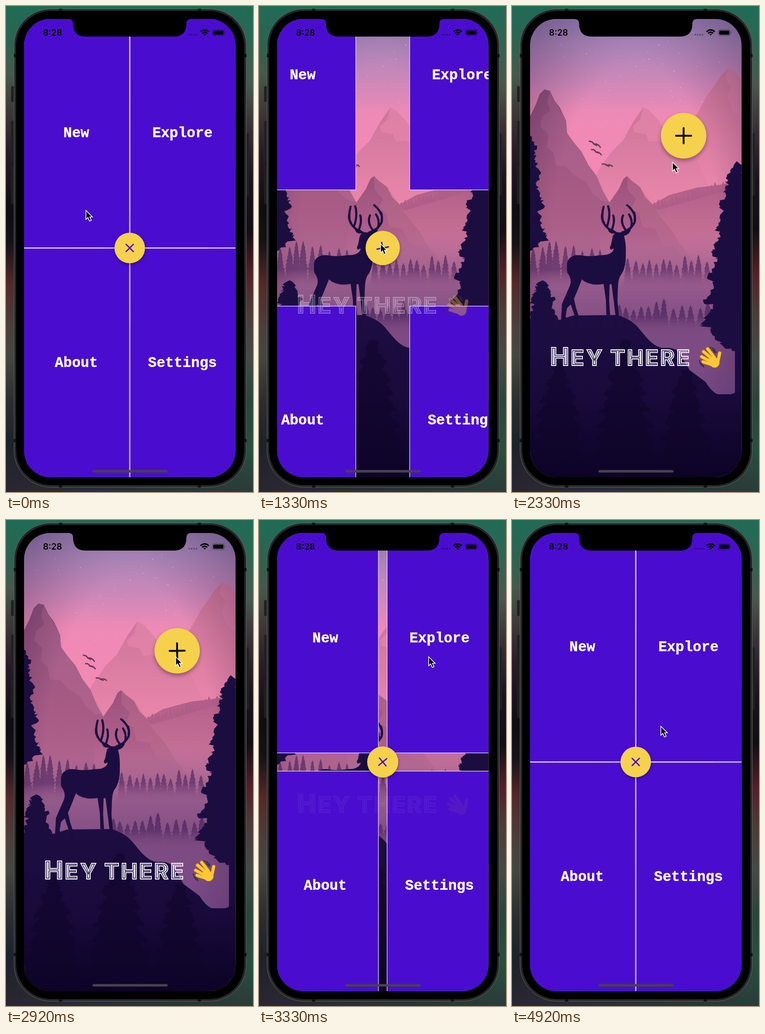
Write an HTML page that moves like this. It is 534x1049 px and loops after 5.01 s.

```html
<!DOCTYPE html>
<html lang="en">
<head>
<meta charset="utf-8">
<title>Quadrant menu</title>
<style>
@property --p { syntax: '<number>'; inherits: true; initial-value: 0; }
html, body { margin: 0; width: 100%; height: 100%; overflow: hidden; background: #222; }
.glow { position: absolute; left: 0; top: 0; width: 534px; height: 1049px; }
.left { background: linear-gradient(#206c56, #2b6552 7%, #465a4b 14%, #413a3a 21%, #291c2a 30%, #100d13 42%, #17131a 49%, #55292a 57%, #4b403c 66%, #46473f 72%, #2d2e31 81%, #1c222b 90%, #2c2632); }
.right { background: linear-gradient(#206c56, #2c6653 7%, #48594d 16%, #3a3035 25%, #1b131c 36%, #120d14 46%, #571f28 55%, #4c3c39 63%, #454a45 72%, #29473c 81%, #27513f 91%, #2b3c38);
  mask-image: linear-gradient(90deg, transparent, #000); -webkit-mask-image: linear-gradient(90deg, transparent, #000); }

/* --p runs from 0 (menu open) to 1 (menu closed) */
svg { position: absolute; left: 0; top: 0; animation: menu 5010ms cubic-bezier(.455, .03, .515, .955) infinite; }
@keyframes menu {
  0%, 23.1% { --p: 0; }
  33.1%, 57.83% { --p: 1; }
  67.83%, 100% { --p: 0; }
}
.panel { transform: translate(calc(var(--sx) * var(--p) * 228.5px), calc(var(--sy) * var(--p) * 495px)); }
.panel rect { fill: #4a0dcf; stroke: #e6dcf6; stroke-width: 1.3; }
.panel text { font: 700 31px 'Liberation Mono', monospace; text-anchor: middle; fill: #fff; stroke: #fff; stroke-width: .5; }
.nw { --sx: -1; --sy: -1; } .ne { --sx: 1; --sy: -1; }
.sw { --sx: -1; --sy: 1; } .se { --sx: 1; --sy: 1; }

.greet { transform: translateY(calc(-150px * (1 - var(--p)))); opacity: min(1, 1.5 * var(--p)); }
.hey { font: 900 49px Inter, sans-serif; letter-spacing: 2.5px; }
.hey .cap { font-size: 56px; }

.fab { --q: max(0, (var(--p) - .3) / .7);
  transform: translate(calc(267.5px + 103.5px * var(--q)), calc(522.3px - 242.3px * var(--q))) scale(calc(1 + .49 * var(--p)));
  filter: drop-shadow(0 3px 3px rgba(0, 0, 0, .35)); }
.plus { --k: min(1, 2 - 2 * var(--p)); transform: rotate(calc(-135deg * (1 - var(--p))));
  stroke: rgb(calc(74 * var(--k)), calc(13 * var(--k)), calc(207 * var(--k))); }

.cursor { animation: roam 5010ms ease-in-out infinite; }
@keyframes roam {
  0% { transform: translate(172px, 440px); }
  20%, 35.9% { transform: translate(262px, 512px); }
  46.5% { transform: translate(346px, 336px); animation-timing-function: ease-out; }
  54%, 79% { transform: translate(366px, 294px); }
  95%, 100% { transform: translate(321px, 444px); }
}
</style>
</head>
<body>
<div class="glow left"></div>
<div class="glow right"></div>
<svg width="534" height="1049" viewBox="0 0 534 1049">
  <defs>
    <clipPath id="screen"><rect x="39" y="28" width="457.3" height="989" rx="57"/></clipPath>
    <linearGradient id="sky" x2="0" y2="1">
      <stop stop-color="#9a80b6"/><stop offset=".06" stop-color="#b188bb"/><stop offset=".13" stop-color="#cb87b9"/>
      <stop offset=".21" stop-color="#ef8ab6"/><stop offset=".4" stop-color="#f389b2"/><stop offset=".55" stop-color="#c97a9f"/>
    </linearGradient>
    <linearGradient id="far" x2="0" y2="1"><stop stop-color="#cc7599"/><stop offset="1" stop-color="#ec87ad"/></linearGradient>
    <linearGradient id="west" x2="0" y2="1"><stop stop-color="#8f507c"/><stop offset=".5" stop-color="#a55a84"/><stop offset="1" stop-color="#b1658f"/></linearGradient>
    <linearGradient id="mid" x2="0" y2="1"><stop stop-color="#9b517c"/><stop offset=".55" stop-color="#b0608a"/><stop offset="1" stop-color="#c87499"/></linearGradient>
    <linearGradient id="ridge" x2="0" y2="1"><stop stop-color="#b05e87"/><stop offset="1" stop-color="#d57ba1"/></linearGradient>
    <linearGradient id="mist" x2="0" y2="1">
      <stop stop-color="#b46b96" stop-opacity="0"/><stop offset=".2" stop-color="#a3638f" stop-opacity=".8"/>
      <stop offset=".36" stop-color="#91588a"/><stop offset=".6" stop-color="#7d4b82"/><stop offset="1" stop-color="#7a4a88"/>
    </linearGradient>
    <linearGradient id="rowA" gradientUnits="userSpaceOnUse" x1="0" y1="500" x2="0" y2="615">
      <stop stop-color="#693869"/><stop offset=".6" stop-color="#713e73"/><stop offset="1" stop-color="#91588a" stop-opacity="0"/>
    </linearGradient>
    <linearGradient id="rowB" gradientUnits="userSpaceOnUse" x1="0" y1="625" x2="0" y2="715">
      <stop stop-color="#592e67"/><stop offset=".5" stop-color="#5f336b"/><stop offset="1" stop-color="#7d4b82" stop-opacity="0"/>
    </linearGradient>
    <linearGradient id="hill" x2="0" y2="1"><stop stop-color="#1d0d42"/><stop offset=".5" stop-color="#190a3b"/><stop offset="1" stop-color="#0c0326"/></linearGradient>
    <radialGradient id="vignette" r=".72"><stop offset=".55" stop-color="#14062a" stop-opacity="0"/><stop offset="1" stop-color="#14062a" stop-opacity=".32"/></radialGradient>
    <!-- nested outlines inside the letters -->
    <mask id="inline" maskUnits="userSpaceOnUse" x="60" y="720" width="360" height="75">
      <use href="#hey" fill="none" stroke="#fff" stroke-width="10.4"/>
      <use href="#hey" fill="none" stroke="#000" stroke-width="6.8"/>
      <use href="#hey" fill="none" stroke="#fff" stroke-width="3.8"/>
    </mask>
    <text id="hey" class="hey" x="82" y="776.5"><tspan class="cap">H</tspan>EY THERE</text>
  </defs>

  <!-- phone body -->
  <g fill="#202022">
    <rect x="11" y="173" width="8" height="34" rx="2"/><rect x="11" y="248" width="8" height="80" rx="2"/>
    <rect x="11" y="346" width="8" height="81" rx="2"/><rect x="517" y="275" width="8" height="134" rx="2"/>
  </g>
  <rect x="17.5" y="6.5" width="502" height="1032" rx="79" fill="#242627" stroke="#626565"/>
  <path d="M17 107h6M17 938h6M514 107h6M514 938h6M118 6v6M418 6v6M118 1033v6M418 1033v6" stroke="#111" stroke-width="7"/>
  <rect x="22" y="11" width="493" height="1023" rx="75"/>

  <g clip-path="url(#screen)">
    <g id="scene">
      <rect x="39" y="28" width="458" height="990" fill="url(#sky)"/>
      <g id="stars" fill="#fff"></g>
      <path fill="url(#far)" d="M496 160 484 143 468 134 451 151 438 172 421 194 404 226 382 260 340 330 300 420H496Z"/>
      <path fill="#e184aa" opacity=".45" d="M468 134 484 143 496 160V240L478 228 466 198 474 174 462 158Z"/>
      <path fill="url(#far)" d="M140 440 185 358 214 316 240 290 262 250 284 219 296 225 318 248 338 281 368 297 396 325 450 440Z"/>
      <path fill="#e688ad" opacity=".65" d="M284 219 296 225 318 248 338 281 366 300 338 303 316 291 296 293 290 277 264 272 262 260 277 245Z"/>
      <path fill="url(#ridge)" d="M290 436 340 408 400 392 450 386 496 376V580H290Z"/>
      <path id="ridgeTrees" fill="#b05e87"/>
      <path fill="url(#west)" d="M39 238 50 216 60 190 70 180 82 183 92 204 104 220 117 248 119 274 133 294 150 314 165 343 183 367 196 399 210 423 232 450 250 590H39Z"/>
      <path fill="#bc6f99" opacity=".35" d="M82 183 92 204 117 248 119 274 150 314 165 343 183 367 210 423 193 419 172 402 160 380 133 364 117 346 95 344 90 318 75 304 79 277 61 260 65 239 83 226 76 206Z"/>
      <path fill="url(#mid)" d="M190 475 212 422 231 395 241 373 249 367 257 376 277 391 288 413 302 426 321 455 347 486 364 516 396 555 425 590H190Z"/>
      <path fill="#c0708f" opacity=".4" d="M249 367 277 391 302 426 347 486 396 555 370 541 351 519 326 515 310 481 282 477 275 448 258 438 268 416 250 397Z"/>
      <rect x="39" y="480" width="458" height="380" fill="url(#mist)"/>
      <path id="rowTreesA" fill="url(#rowA)"/>
      <path id="rowTreesB" fill="url(#rowB)"/>
      <path fill="none" stroke="#673a5a" stroke-width="2.8" stroke-linecap="round" stroke-linejoin="round"
        d="M167 292q7 0 10 6 8-2 14 7M177 298l6 3M172 310q6-1 9 5 6-1 12 6M181 315l6 2M195 341q7-1 10 3 6-3 12 2M204 344l6 2"/>
      <rect x="39" y="28" width="458" height="990" fill="url(#vignette)"/>
      <path fill="#1c0d41" d="M482 700h14v150h-14Z"/>
      <path fill="url(#hill)" d="M39 680 105 677 132 668 228 667Q258 677 271 692L292 717Q312 739 330 738 357 736 366 755L384 786 418 811Q434 836 446 838H474L496 829V1018H39Z"/>
      <path id="sideTrees" fill="#1c0d41"/>
      <path id="nearTrees" fill="#100529" opacity=".55"/>
      <!-- deer -->
      <g fill="#1c0d41">
        <path d="M119 561C118 544 131 536 148 538 168 542 187 538 204 537 215 534 221 528 219 523 213 530 209 522 214 516L217 501Q218 493 223 491 209 493 207 481 220 480 224 488L238 489Q246 479 257 482 254 494 242 496 247 512 246 535 247 561 238 577 230 585 229 606L228 636 231 669 224 671 220 637 215 600 211 601 210 636 212 667H204L203 634 198 600Q167 605 151 590L144 608 134 632 138 650 145 672 149 676H138L127 644 119 652 116 669 118 677H106L108 643 125 604Q130 592 122 579Q118 577 119 561Z"/>
        <path fill="none" stroke="#1c0d41" stroke-width="4.6" stroke-linecap="round" d="M224 489Q204 481 197 466 193 452 198 433M205 477Q214 452 208 432M215 485Q223 466 219 452M199 468Q193 462 195 449M238 489Q258 482 265 467 270 447 249 430M257 479Q262 464 253 450M247 485Q233 468 240 452M265 462Q267 456 264 446"/>
      </g>
    </g>

    <g class="panel nw"><rect x="30" y="20" width="236.9" height="501.7"/><text x="152" y="283">New</text></g>
    <g class="panel ne"><rect x="268.2" y="20" width="236.9" height="501.7"/><text x="381.5" y="283">Explore</text></g>
    <g class="panel sw"><rect x="30" y="523" width="236.9" height="505"/><text x="152" y="778.5">About</text></g>
    <g class="panel se"><rect x="268.2" y="523" width="236.9" height="505"/><text x="381.5" y="778.5">Settings</text></g>

    <g class="greet">
      <g mask="url(#inline)"><use href="#hey" fill="#fff"/></g>
      <g fill="none" stroke-linecap="round">
        <path stroke="#3a3547" stroke-width="2.5" d="M405 765q1 10 10 14M409 771q1 4 5 5M428 737q10 1 13 11M433 742q4 2 5 6"/>
        <g id="hand"><path d="M432 774 413 768M430 768 410 757M433 762 414 746M437 758 423 740M445 768 449 749"/><path d="M434 767 438 770" stroke-width="22"/></g>
      </g>
    </g>

    <g class="fab">
      <circle r="33" fill="#f5d14c"/>
      <path class="plus" d="M-11 0h22M0-11v22" stroke-width="2.7" stroke-linecap="round"/>
    </g>

    <path d="M135 26V28Q145 28 145 38 145 66 172 66H363Q390 66 390 38 390 28 400 28V26Z"/>
    <text x="80" y="64" font-family="Inter, sans-serif" font-size="18.5" font-weight="600">8:28</text>
    <g opacity=".3"><circle cx="396" cy="62" r="2"/><circle cx="401.3" cy="62" r="2"/><circle cx="406.6" cy="62" r="2"/><circle cx="411.9" cy="62" r="2"/></g>
    <path fill="none" stroke="#000" stroke-width="2.8" d="M420.5 55.5q9-8 18 0M423.8 59q5.7-5 11.4 0"/>
    <path d="M426.5 60.8q3-2.2 6 0l-3 3.2Z"/>
    <rect x="446" y="51" width="26" height="13" rx="4" fill="none" stroke="#000" stroke-opacity=".45"/>
    <rect x="448" y="53" width="22" height="9" rx="2.2"/><path d="M473.5 55.5q2 2 0 4Z" opacity=".5"/>
    <rect x="187" y="1001.5" width="162.5" height="5.5" rx="2.7" fill="#46424c"/>
  </g>

  <g class="cursor"><path d="M.8 1.2V20.5L5.2 16.6 8.6 24.3 12.4 22.6 9 15.2H14.8Z" stroke="#fff" stroke-width="1.5"/></g>
</svg>
<script>
const $ = id => document.getElementById(id);
let seed = 828;
const rnd = () => (seed = (seed * 16807) % 2147483647) / 2147483647;
const between = (a, b) => a + (b - a) * rnd();
const outline = pts => 'M' + pts.map(p => p.map(v => v.toFixed(1)).join(' ')).join('L') + 'Z';

// A conifer outline: ragged tiers widening from the tip down.
function conifer(x, top, base, half, tiers) {
  const side = dir => {
    const pts = [];
    for (let i = 1; i <= tiers; i++) {
      const f = i / tiers, w = half * f ** .65 * between(.85, 1.15), y = top + (base - top) * f;
      pts.push([x + dir * w, y], [x + dir * w * between(.68, .82), y + 1]);
    }
    return pts;
  };
  return outline([[x, top], ...side(1), ...side(-1).reverse()]);
}

// A row of conifers whose base follows a function of x.
function row(from, to, step, low, high, base) {
  let d = '';
  for (let x = from; x < to; x += step * between(.75, 1.2)) {
    const h = between(low, high), b = base(x);
    d += conifer(x, b - h, b, step * .78, Math.max(4, Math.round(h / 8)));
  }
  return d;
}

// Leafy outline: boughs swell downwards every `bough` px, with fine noise on the edge.
function foliage(x, top, base, half, bough, power = .55) {
  const side = dir => {
    const pts = [], phase = between(0, bough);
    for (let y = top + 3; y < base; y += between(2, 5)) {
      const f = (y - top) / (base - top), swell = ((y + phase) % bough) / bough;
      const w = half * f ** power * (.72 + .33 * swell) * Math.min(1, (1 - f) * 9);
      pts.push([x + dir * Math.max(1, w + between(-5, 5)), y + between(-3, 3)]);
    }
    return pts;
  };
  return outline([[x, top], ...side(1), ...side(-1).reverse()]);
}

const draw = (id, d) => $(id).setAttribute('d', d);
draw('ridgeTrees', row(300, 480, 8, 14, 24, x => 444 - (x - 300) * .29));
draw('rowTreesA', row(46, 205, 18, 72, 108, () => 608) + row(250, 432, 17, 58, 84, () => 616));
draw('rowTreesB', row(232, 425, 18, 48, 84, () => 706));
draw('sideTrees', foliage(486, 335, 750, 82, 52) + foliage(26, 265, 540, 52, 66, .4)
  + foliage(66, 592, 765, 42, 40, .4));
draw('nearTrees', foliage(245, 720, 1040, 78, 34) + foliage(375, 785, 1040, 66, 34) + foliage(100, 770, 1040, 72, 34));

let dots = '';
for (let i = 0; i < 130; i++) {
  const y = between(45, 300);
  dots += `<circle cx="${between(42, 494).toFixed(1)}" cy="${y.toFixed(1)}" r="${between(.4, 1.1).toFixed(2)}" opacity="${(between(.2, .8) * (1 - y / 420)).toFixed(2)}"/>`;
}
$('stars').innerHTML = dots;

// Dark rim under a bright fill.
const hand = $('hand').innerHTML;
$('hand').innerHTML = `<g stroke="#d58b16" stroke-width="7.6">${hand}</g><g stroke="#fcc934" stroke-width="5.8">${hand.replace('"22"', '"20"')}</g>`;
</script>
</body>
</html>
```
